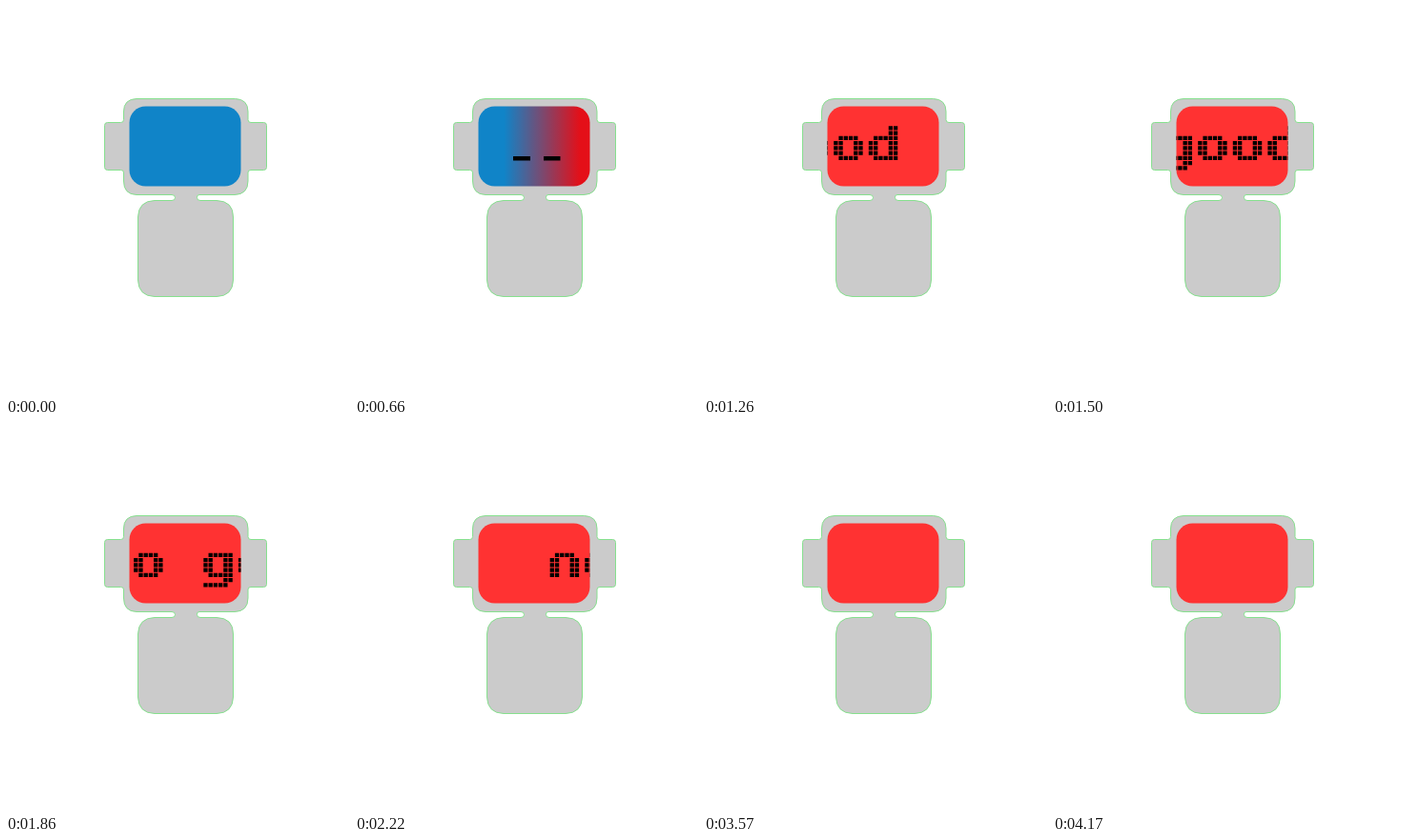
An HTML page for the animation above (4200 ms loop, 360 by 409 pixels).

```html
<!DOCTYPE html>
<html lang="en">
<head>
<meta charset="utf-8">
<title>Robot</title>
<style>
  html, body { margin: 0; width: 100%; height: 100%; overflow: hidden; background: #fff; }
  svg { display: block; width: 360px; height: 409px; }
</style>
</head>
<body>
<svg viewBox="0 0 360 409" role="img" aria-label="Robot whose display reads: no good">
  <defs>
    <clipPath id="glass"><rect x="129.500" y="105.500" width="117" height="84" rx="17"/></clipPath>
    <linearGradient id="wash" gradientUnits="userSpaceOnUse" y1="0" y2="0">
      <stop offset="0" stop-color="#1084c8"/>
      <stop id="hot" offset="1" stop-color="#e40f18"/>
    </linearGradient>
  </defs>
  <path fill="#cbcbcb" stroke="#86e08e" d="
    M137 97.500 H240.500 Q254 98 254 111 V119.500 Q254 122.500 257 122.500
    H270.500 Q273.500 122.500 273.500 125.500 V169.500 Q273.500 172.500 270.500 172.500
    H257 Q254 172.500 254 175 V184 Q254 198 240 198.500
    H203 Q200 198.500 200.500 201.500 Q200.500 204.500 204 204.500
    H221 Q238.500 205 238.500 222 V288 Q238 305 221 305.500
    H156 Q139 305 138.500 288 V222 Q139 205 156 204.500
    H174 Q177.500 204.500 177.500 201.500 Q177.500 198.500 174 198.500
    H137 Q123.500 198 123.500 184 V175 Q123.500 172.500 120.500 172.500
    H106.500 Q103.500 172.500 103.500 169.500 V125.500 Q103.500 122.500 106.500 122.500
    H120.500 Q123.500 122.500 123.500 119.500 V111 Q123.500 98 137 97.500 Z"/>
  <g clip-path="url(#glass)">
    <rect x="129" y="105" width="118" height="85" fill="url(#wash)"/>
    <path id="eyes" d="M166 158h18v4.500h-18z M198 158h17.500v4.500h-17.500z"/>
    <path id="words"/>
  </g>
</svg>
<script>
const LOOP = 4200, STEP = 30;
const CELL = 5.23, DOT = 4.3, TOP = 126.3, ADVANCE = 7 * CELL;

// Dot letters: rows from the ascender line down
const side = ['##..##', '##..##', '##..##'];
const glyphs = {
  n: ['', '', '.####.', ...side, '##..##'],
  o: ['', '', '.####.', ...side, '.####.'],
  g: ['', '', '.#####', ...side, '.#####', '....##', '#####.'],
  d: ['....##', '....##', '.#####', ...side, '.#####'],
  ' ': []
};

const $ = id => document.getElementById(id);
const clamp = v => Math.min(1, Math.max(0, v));
const mix = (a, b, k) => a + (b - a) * k;

function dots(text) {
  let d = '';
  [...text].forEach((ch, i) => glyphs[ch].forEach((row, y) =>
    [...row].forEach((c, x) => {
      if (c === '#') {
        const px = i * ADVANCE + x * CELL, py = TOP + y * CELL;
        d += `M${px.toFixed(2)} ${py.toFixed(2)}h${DOT}v${DOT}h-${DOT}z`;
      }
    })));
  return d;
}

// The words speed up as they cross the screen to the right
function wordsX(t) {
  const s = t - 960;
  return 116.7 - 6 * ADVANCE + 0.2013 * s + 5.95e-5 * s * (s - 540);
}

function draw(t) {
  const edge = mix(246, 50, clamp((t - 500) / 350));
  $('wash').setAttribute('x1', edge);
  $('wash').setAttribute('x2', edge + 80);

  const k = clamp((t - 660) / 190);
  const rgb = [mix(228, 255, k), mix(15, 50, k), mix(24, 50, k)].map(Math.round);
  $('hot').setAttribute('stop-color', `rgb(${rgb})`);

  $('eyes').style.display = t >= 330 && t < 780 ? '' : 'none';
  $('words').style.display = t > 780 && t < 2700 ? '' : 'none';
  $('words').setAttribute('transform', `translate(${wordsX(t).toFixed(2)} 0)`);
}

$('words').setAttribute('d', dots('no good'));
const start = performance.now();

function tick() {
  const t = (performance.now() - start) % LOOP;
  draw(Math.floor(t / STEP) * STEP);
  requestAnimationFrame(tick);
}
tick();
</script>
</body>
</html>
```
